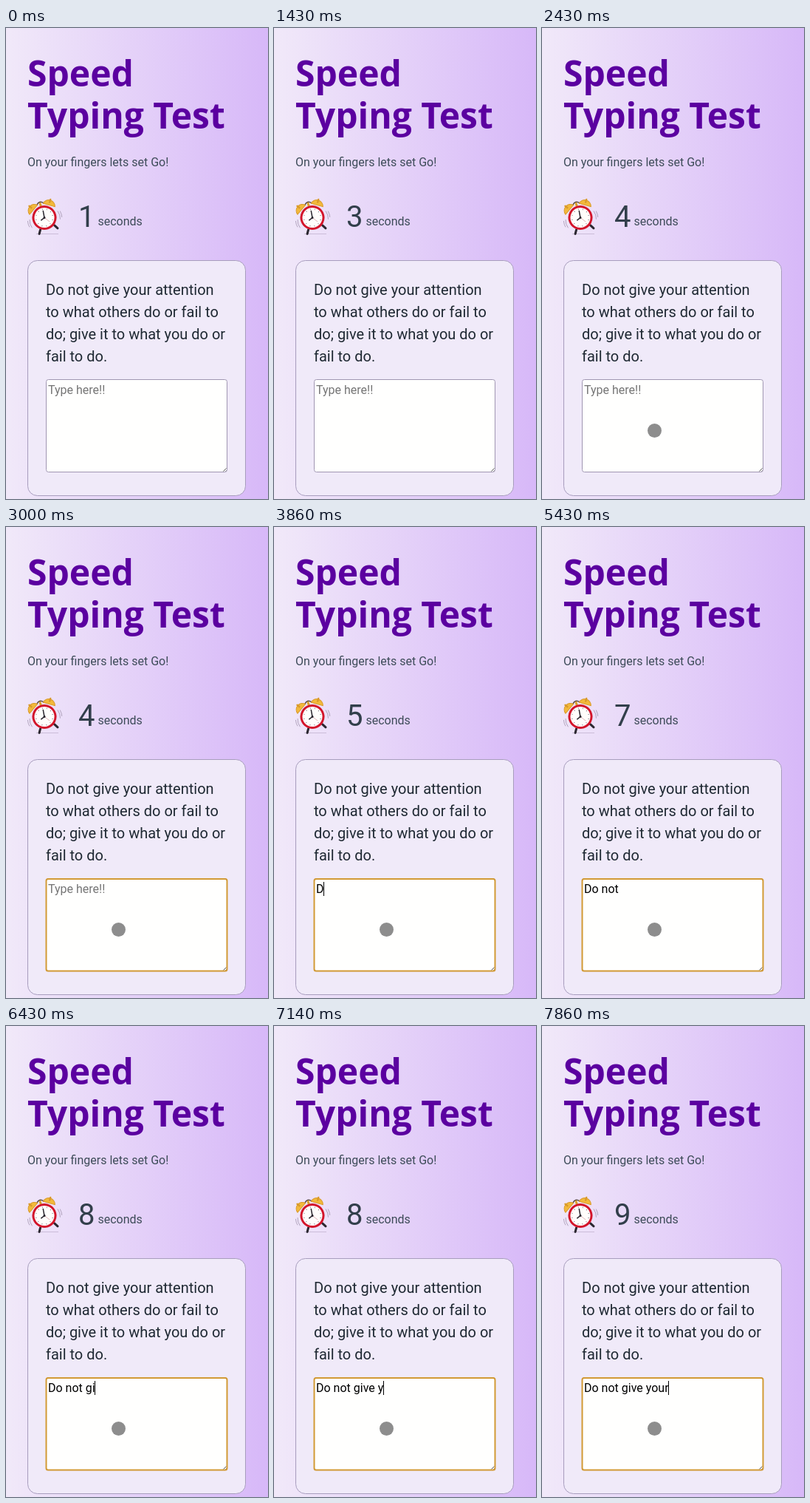
Recreate the animation shown at these times as an HTML page. Size 355 px wide and 637 px high, loop 8 s.

```html
<!DOCTYPE html>
<html lang="en">
<head>
<meta charset="utf-8">
<title>Speed Typing Test</title>
<style>
  html, body { margin: 0; width: 100%; height: 100%; overflow: hidden; }
  svg { display: block; width: 355px; height: 637px; background: linear-gradient(90deg, #f1e9f9, #d7b8f8); }
  text { font: 16px Roboto, sans-serif; fill: #3e4c59; white-space: pre; }
  .title text { font: 700 48px "Open Sans", sans-serif; fill: #5b00a0; }
  .quote text { font-size: 20px; fill: #1f2933; }
  #count { font-size: 40px; fill: #323f4b; }
  #hint { fill: #757575; }
  #typed { fill: #000; }
</style>
</head>
<body>
<svg viewBox="0 0 355 637">
  <g class="title">
    <text x="29" y="79">Speed</text>
    <text x="29" y="136">Typing Test</text>
  </g>
  <text x="29" y="187">On your fingers lets set Go!</text>

  <!-- alarm clock -->
  <path d="M41 278.5H71" stroke="#cbbcd8"/>
  <g transform="translate(52 256.5) rotate(-17)" fill="none" stroke-linecap="round">
    <path d="M-10 14L-13 19M10 14L13 19" stroke="#2b2730" stroke-width="3"/>
    <path d="M-5 -19Q0 -25 5 -19" stroke="#5a4a40" stroke-width="1.5"/>
    <path d="M0 -16V-20" stroke="#d9a02c" stroke-width="3"/>
    <g id="bell">
      <path d="M-18 -10A8.5 8.5 0 0 1 -4 -19Z" fill="#f2b93b" stroke="#d99a2a"/>
      <path d="M-15 -21L-13 -18" stroke="#d99a2a" stroke-width="2.5"/>
      <path d="M-20 -3Q-22 3 -20 8M-23 -2Q-24 3 -23 6" stroke="#a99bb5" stroke-width=".8"/>
    </g>
    <use href="#bell" transform="scale(-1 1)"/>
    <circle r="15" fill="#fffdfb" stroke="#d3152b" stroke-width="3"/>
    <circle r="11.5" stroke="#77717d" stroke-width="1.5" stroke-linecap="butt" stroke-dasharray=".8 5.22"/>
    <path d="M0 0L1 -9M0 0L-5 2" stroke="#29252d" stroke-width="1.5"/>
    <path d="M0 0L5 7" stroke="#d9a0a5" stroke-width=".7"/>
    <circle r="1.5" fill="#29252d"/>
  </g>

  <text id="count" x="98" y="269"></text>
  <text x="124.5" y="267">seconds</text>

  <rect x="29.5" y="314.5" width="295" height="318" rx="13" fill="#f0eaf9" stroke="#a79dbd"/>
  <g class="quote">
    <text x="54" y="361">Do not give your attention</text>
    <text x="54" y="391">to what others do or fail to</text>
    <text x="54" y="421">do; give it to what you do or</text>
    <text x="54" y="451">fail to do.</text>
  </g>

  <rect x="54.5" y="475.5" width="245" height="125" rx="3" fill="#fffffe" stroke="#a096b2"/>
  <path d="M294.5 599.5L298.5 595.5M297.5 599.5L298.5 598.5" stroke="#555"/>
  <rect id="focus" x="54.5" y="476" width="245" height="124.5" rx="2.5" fill="none" stroke="#d29a35" stroke-width="2"/>
  <text id="hint" x="57" y="495">Type here!!</text>
  <text id="typed" x="57" y="495"></text>
  <rect id="caret" y="480" width="1" height="19"/>
  <circle id="touch" r="9.5" fill="#8d8d8d"/>
</svg>
<script>
const LOOP = 8000;
const $ = id => document.getElementById(id);
const show = (id, on) => $(id).setAttribute('visibility', on ? 'visible' : 'hidden');

// Each list holds [start time, value]; a value lasts until the next start.
const phrase = 'Do not give your';
const lengths = [[0, 0], [3860, 1], [4140, 2], [4430, 4], [4570, 5], [4860, 6], [5000, 7],
  [6000, 8], [6140, 9], [6570, 11], [6710, 12], [7140, 13], [7430, 14], [7570, 15], [7860, 16]];
const caretOn = [[0, false], [2710, true], [3000, false], [3570, true], [5430, false], [6000, true]];
const touches = [[0, null], [2000, [103.5, 596.5]], [2140, [169.5, 570.5]], [2280, [158.5, 550.5]],
  [2430, [152.5, 544.5]], [3570, null], [3860, [152.5, 544.5]]];
const at = (list, t) => list.findLast(([start]) => start <= t)[1];

function draw(t) {
  $('count').textContent = t < 430 ? 1 : 2 + Math.floor((t - 430) / 1000);

  const length = at(lengths, t);
  $('typed').textContent = phrase.slice(0, length);
  show('hint', !length);
  show('focus', t >= 2710);
  show('caret', at(caretOn, t));
  const width = length ? $('typed').getComputedTextLength() : 0;
  $('caret').setAttribute('x', Math.floor(57 + width));

  const touch = at(touches, t);
  show('touch', touch);
  if (touch) $('touch').setAttribute('transform', `translate(${touch})`);
}

const start = performance.now();
function tick() {
  draw((performance.now() - start) % LOOP);
  requestAnimationFrame(tick);
}
tick();
</script>
</body>
</html>
```
